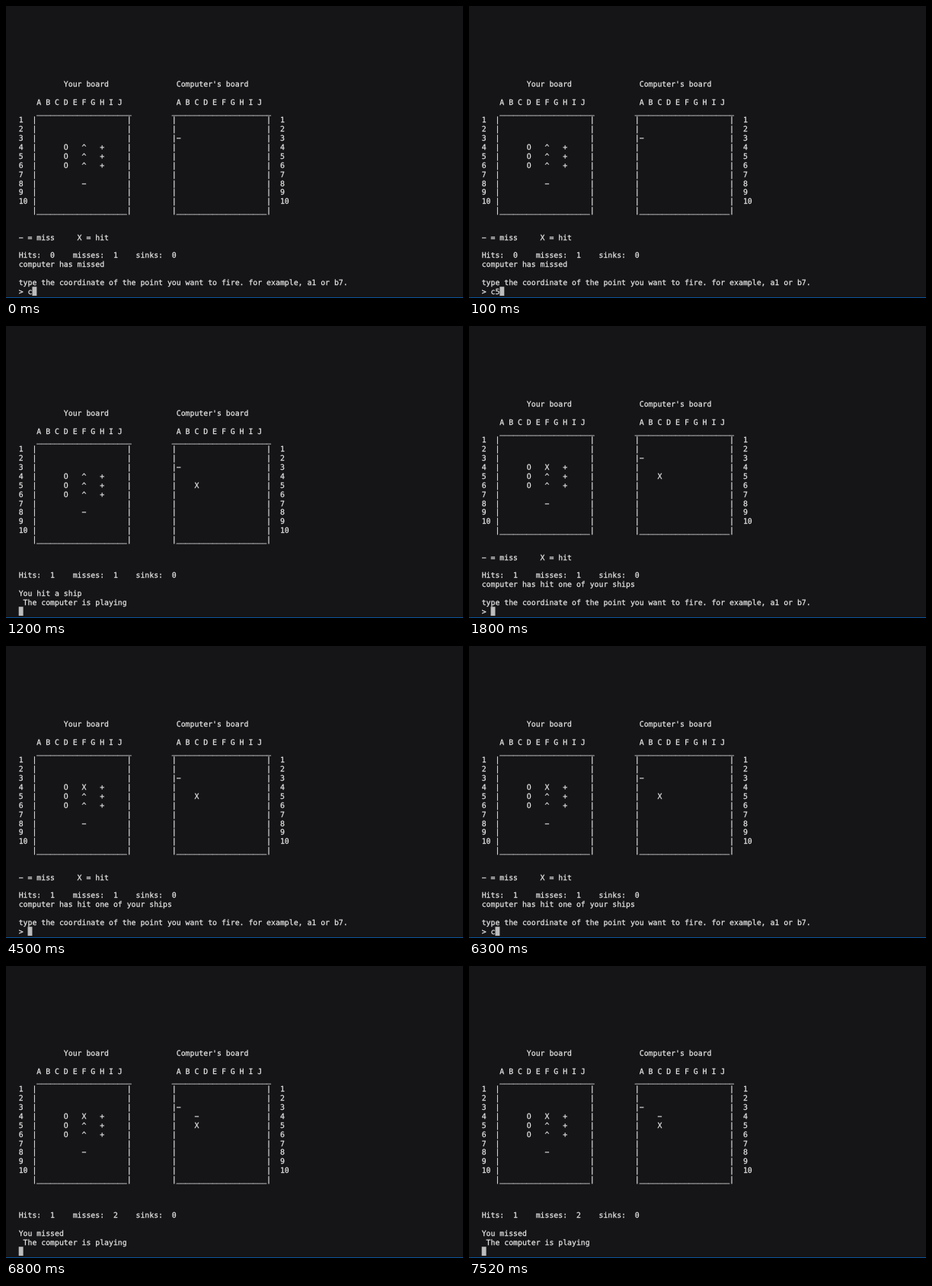
Recreate the animation shown at these times as an HTML page. Size 600 by 384 pixels, loop 8 s.

```html
<!DOCTYPE html>
<html lang="en">
<head>
<meta charset="utf-8">
<title>Battleship terminal</title>
<style>
  html, body { margin: 0; width: 100%; height: 100%; overflow: hidden; background: #151416; }
  svg { display: block; width: 600px; height: 384px; }
  text {
    font: 9.83px "DejaVu Sans Mono", monospace;
    fill: #e6e6e6;
    stroke: #e6e6e6;
    stroke-width: 0.25px;
    white-space: pre;
    text-rendering: geometricPrecision;
  }
  #cursor { fill: #bdbdbd; }
  #edge { fill: #0a559b; }
</style>
</head>
<body>
<svg viewBox="0 0 600 384">
  <g id="lines"></g>
  <rect id="cursor"/>
  <rect id="edge" y="383" width="600" height="1"/>
</svg>
<script>
const LOOP = 8000;
const CELL = { w: 5.918, h: 11.87 };
const ORIGIN = { x: 16.7, y: 96.6 };
const BASELINE = 9.35;
const ROWS = 24;
const LETTERS = "A B C D E F G H I J";
const PROMPT = "type the coordinate of the point you want to fire. for example, a1 or b7.";

// Joins [column, text] pairs into one terminal line.
const line = (...parts) =>
  parts.reduce((out, [col, text]) => out.padEnd(col) + text, "");

// Cells are keyed by coordinate, such as { c5: "X" }.
const gridRow = (cells, row) =>
  [..."abcdefghij"].map(col => cells[col + row] || " ").join(" ") + " ";

const fleet = { f8: "−" };
for (const row of [4, 5, 6]) {
  Object.assign(fleet, { ["d" + row]: "O", ["f" + row]: "^", ["h" + row]: "+" });
}

function boards(own, enemy) {
  const rows = Array.from({ length: 10 }, (_, i) => {
    const n = i + 1;
    return line([0, `${n}`], [3, `|${gridRow(own, n)}|`],
                [34, `|${gridRow(enemy, n)}|`], [58, `${n}`]);
  });
  const floor = `|${"_".repeat(20)}|`;
  return [
    line([10, "Your board"], [35, "Computer's board"]),
    "",
    line([4, LETTERS], [35, LETTERS]),
    line([4, "_".repeat(21)], [34, "_".repeat(22)]),
    ...rows,
    line([3, floor], [34, floor]),
  ];
}

const score = (hits, misses) => `Hits:  ${hits}    misses:  ${misses}    sinks:  0`;

const asking = (own, enemy, hits, result, typed) => [
  ...boards(own, enemy), "", "",
  line([0, "− = miss"], [13, "X = hit"]), "",
  score(hits, 1), result, "", PROMPT, "> " + typed,
];

const waiting = (own, enemy, misses, result) => [
  "", ...boards(own, enemy), "", "", "",
  score(1, misses), "", result, " The computer is playing", "",
];

const opening = { a3: "−" };
const afterHit = { ...opening, c5: "X" };
const afterMiss = { ...afterHit, c4: "−" };
const damaged = { ...fleet, f4: "X" };

const first = typed => asking(fleet, opening, 0, "computer has missed", typed);
const second = typed => asking(damaged, afterHit, 1, "computer has hit one of your ships", typed);

const steps = [
  [0, first("c")],
  [100, first("c5")],
  [300, waiting(fleet, afterHit, 1, "You hit a ship")],
  [1800, second("")],
  [6300, second("c")],
  [6600, second("c4")],
  [6800, waiting(damaged, afterMiss, 2, "You missed")],
];

const cursor = document.getElementById("cursor");
const lines = Array.from({ length: ROWS }, (_, row) => {
  const text = document.createElementNS("http://www.w3.org/2000/svg", "text");
  text.setAttribute("x", ORIGIN.x);
  text.setAttribute("y", ORIGIN.y + row * CELL.h + BASELINE);
  return document.getElementById("lines").appendChild(text);
});
cursor.setAttribute("y", ORIGIN.y + (ROWS - 1) * CELL.h - 0.4);
cursor.setAttribute("width", CELL.w);
cursor.setAttribute("height", CELL.h);

let shown;
function render(now) {
  const time = now % LOOP;
  const screen = steps.findLast(([start]) => start <= time)[1];
  if (screen !== shown) {
    shown = screen;
    lines.forEach((text, row) => { text.textContent = screen[row]; });
    cursor.setAttribute("x", ORIGIN.x + screen[ROWS - 1].length * CELL.w);
  }
}

const start = performance.now();
function tick() {
  render(performance.now() - start);
  requestAnimationFrame(tick);
}
tick();
</script>
</body>
</html>
```
